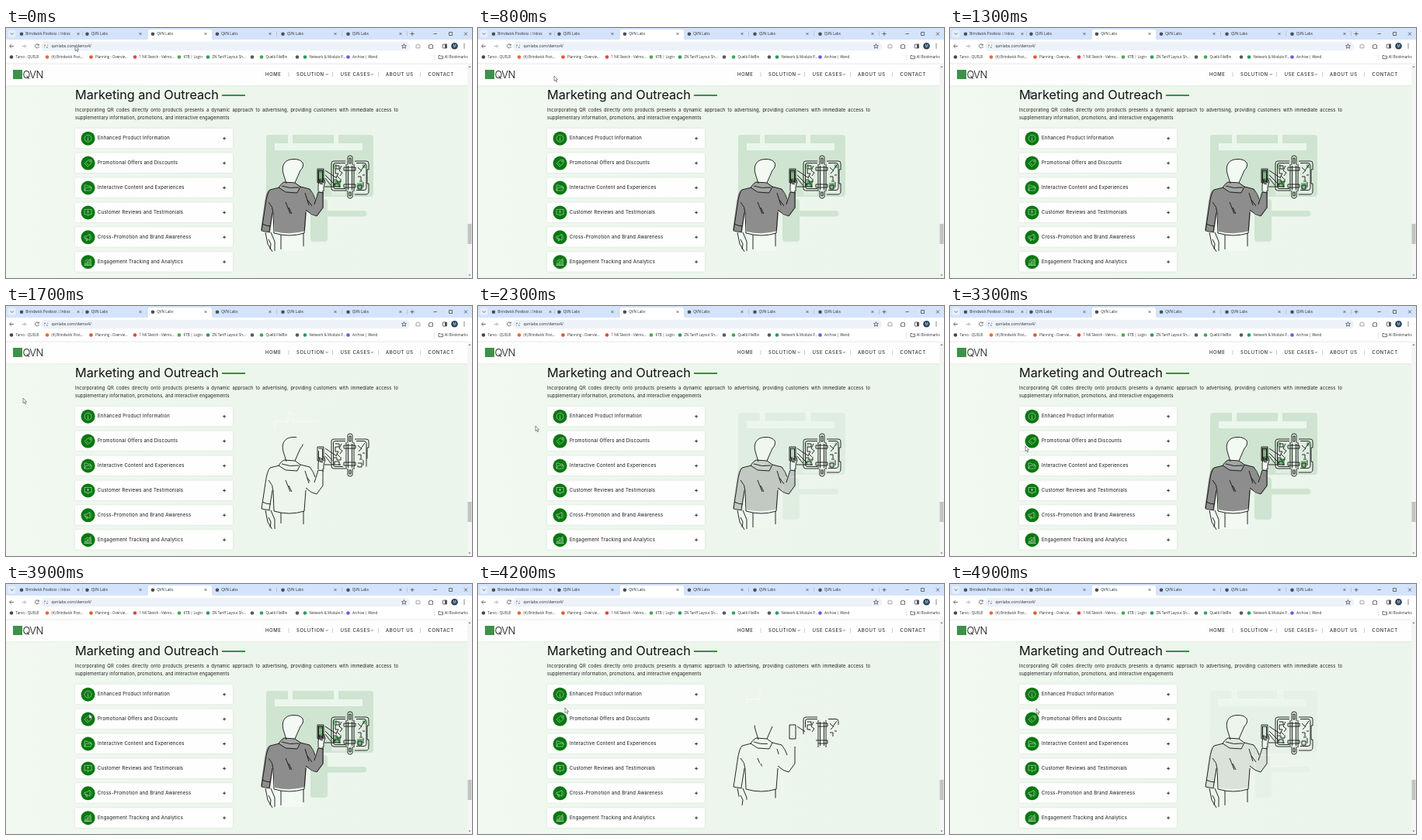
These frames come from a looping animation (600 by 323 pixels, 5000 ms). An HTML page:

```html
<!DOCTYPE html>
<html lang="en">
<head>
<meta charset="utf-8">
<title>Marketing and Outreach</title>
<style>
@property --d { syntax: "<number>"; inherits: true; initial-value: 1; }
@property --f { syntax: "<number>"; inherits: true; initial-value: 1; }
html, body { margin: 0; width: 100%; height: 100%; overflow: hidden; background: #ecf6ed; }
svg { position: absolute; left: 0; top: 0; width: 600px; height: 323px; }
text { font-family: Inter, sans-serif; fill: #111; }
.ui text { font-family: "Open Sans", "Noto Sans", sans-serif; fill: #2b2e33; }
.ico { fill: none; stroke: #4a4d52; stroke-width: .8; }
.menu text { font-size: 6px; letter-spacing: .6px; }
.row text { font-size: 6px; letter-spacing: .25px; }
.row path { fill: none; stroke: #e3f0e3; stroke-width: .55; stroke-linejoin: round; }
.row .plus { stroke: #222; stroke-width: .9; }
.card { fill: #fdfefd; filter: drop-shadow(0 .6px .8px #0000001a); }
.para { position: absolute; left: 89px; top: 101px; width: 416px; font: 5.8px/10.2px Inter, sans-serif; letter-spacing: .12px; color: #1c1c1c; white-space: nowrap; }
.para div { height: 10.2px; }
.para div:first-child { text-align-last: justify; white-space: normal; }

.art { animation: draw 5s infinite, tint 5s infinite; }
.fill { opacity: var(--f); }
.line path { --s: 0; fill: none; stroke: #111; stroke-width: .9; stroke-dasharray: 1px 1px;
  stroke-dashoffset: calc(1px * clamp(0, 1 - (var(--d) - var(--s)) * var(--k), 1)); }
.line .late { --s: .27; }
.line .halo { stroke: #fff; stroke-width: .6; opacity: calc(1 - var(--f)); }
@keyframes draw {
  0% { --d: 1; animation-timing-function: steps(1); }
  28% { --d: .09; animation-timing-function: steps(5); }
  38% { --d: 1; animation-timing-function: steps(1); }
  82% { --d: .09; animation-timing-function: steps(5); }
  92%, 100% { --d: 1; }
}
@keyframes tint {
  0% { --f: 1; animation-timing-function: steps(1); }
  28% { --f: 0; animation-timing-function: steps(1); }
  42% { --f: 0; animation-timing-function: steps(2); }
  46% { --f: .43; animation-timing-function: steps(3); }
  52% { --f: 1; animation-timing-function: steps(1); }
  82% { --f: 0; animation-timing-function: steps(1); }
  96% { --f: .07; animation-timing-function: steps(1); }
  98%, 100% { --f: .18; animation-timing-function: steps(1); }
}
.cursor { animation: move 5s infinite; }
.arrow { animation: hide 5s infinite steps(1); }
.beam { animation: show 5s infinite steps(1); }
@keyframes move {
  0% { transform: translate(89px, 23px); animation-timing-function: steps(1); }
  16% { transform: translate(98px, 62px); animation-timing-function: steps(1); }
  22% { transform: translate(101px, 74px); animation-timing-function: steps(2); }
  26% { transform: translate(104px, 83px); animation-timing-function: steps(4); }
  34% { transform: translate(22px, 119px); animation-timing-function: steps(6); }
  46% { transform: translate(74px, 155px); animation-timing-function: steps(10); }
  66% { transform: translate(97px, 181px); animation-timing-function: steps(1); }
  70% { transform: translate(100px, 178px); animation-timing-function: steps(7); }
  84% { transform: translate(112px, 160px); animation-timing-function: steps(7); }
  98%, 100% { transform: translate(111px, 161px); animation-timing-function: steps(1); }
}
@keyframes hide {
  0%, 28%, 100% { opacity: 1; }
  24% { opacity: 0; }
}
@keyframes show {
  0%, 28%, 100% { opacity: 0; }
  24% { opacity: 1; }
}
</style>
</head>
<body>
<svg viewBox="0 0 600 323">
  <defs>
    <linearGradient id="page">
      <stop offset="0" stop-color="#f1f9f1"/><stop offset=".5" stop-color="#ecf6ec"/><stop offset="1" stop-color="#ebf5eb"/>
    </linearGradient>
  </defs>
  <rect y="46" width="600" height="277" fill="url(#page)"/>

  <g class="ui">
    <rect width="600" height="20" fill="#d3e3fb"/>
    <rect y="15" width="600" height="31" fill="#fff"/>
    <path d="M180 15.5q3 0 3-3V5q0-3 3-3h76q3 0 3 3v7.500q0 3 3 3z" fill="#fff"/>
    <rect x="2.500" y="2.500" width="10" height="10" rx="3" fill="#e6eefc"/>
    <path class="ico" d="M5.700 6.500l2 2 2-2M520.500 7.500h5M523 5v5M550.500 7.500h4.500M570.500 5.500h4v4h-4zM590 5.500l4 4m0-4l-4 4"/>
    <path d="M348.500 4.500v6M432.500 4.500v6M516.500 4.500v6M98.500 4.500v6" stroke="#9fb3d3" stroke-width=".6"/>
    <g id="tabs"></g>
    <rect x="45" y="17.800" width="475" height="11.500" rx="5.700" fill="#edf1f8"/>
    <path class="ico" d="M10 23.500H5m2-2.300l-2.300 2.300 2.300 2.300M42 21.800a2.500 2.500 0 1 0 .4 2.300m0-3.300v1.500h-1.800M49 22.300h2m2 0h.8M49 25h.8m2 0h2"/>
    <path class="ico" d="M20.500 23.500h5m-2-2.300l2.300 2.300-2.300 2.300" opacity=".5"/>
    <path class="ico" d="M512.500 20.500l.9 2 2.100.2-1.600 1.400.5 2.100-1.900-1.100-1.900 1.100.5-2.100-1.600-1.400 2.100-.2zM544.500 22h1.500a1 1 0 0 1 2 0h1.500v4.300h-5zM562.500 21h5v5h-5z"/>
    <path class="ico" d="M528 22h1l.6-.9h1.800l.6.900h1v3.800h-5z" opacity=".6"/>
    <path d="M565 21h2.500v5H565z" fill="#4a4d52"/>
    <circle cx="577.500" cy="23.300" r="4.300" fill="#27465f"/>
    <text x="577.500" y="25" font-size="4.600" text-anchor="middle" style="fill:#fff">M</text>
    <path d="M590 20.300v1.200m0 1.200v1.200m0 1.200v1.200" stroke="#444" stroke-width="1.200"/>
    <path d="M551.500 34v7" stroke="#c5d3ea" stroke-width=".6"/>
    <path class="ico" d="M557 35.500h2l.7.700h2.800v3.500H557z"/>
    <g id="marks"></g>
  </g>

  <g class="menu">
    <rect y="46" width="594" height="28" fill="#fdfefd" style="filter:drop-shadow(0 .5px .8px #00000014)"/>
    <path d="M0 46.300h600" stroke="#dfe3ea" stroke-width=".6"/>
    <rect x="9" y="54" width="12" height="12" fill="#3f9149"/>
    <text x="21.500" y="64.900" style="font-size:13px;font-weight:300;letter-spacing:-.6px">QVN</text>
    <text x="334" y="62.200">HOME</text>
    <text x="374" y="62.200">SOLUTION</text>
    <text x="430.500" y="62.200">USE CASES</text>
    <text x="489" y="62.200">ABOUT US</text>
    <text x="543.500" y="62.200">CONTACT</text>
    <path d="M364 57v6M420.500 57v6M479.500 57v6M533.500 57v6" stroke="#bbb" stroke-width=".7"/>
    <path class="ico" d="M411.800 59.200l1.400 1.400 1.400-1.400M469.800 59.200l1.400 1.400 1.400-1.400"/>
  </g>

  <text x="89" y="92.300" font-size="16.300" letter-spacing="-.05">Marketing and Outreach</text>
  <path d="M278 87h30" stroke="#08780f" stroke-width="1.600"/>
  <g id="rows"></g>

  <g class="art">
    <g class="fill">
      <path fill="#cfe4d1" d="M339 138h130q4 0 4 4v72q0 4-4 4H339q-4 0-4-4v-72q0-4 4-4z"/>
      <path fill="#ebf6ec" d="M346 150q0-1.500 1.500-1.500t1.500 1.500v-1h14v-11h6v11h53v-11h6v11h28v1q0-1.500 1.500-1.500t1.500 1.500v8H346z"/>
      <path fill="#cfe4d1" d="M396 221h14q4 0 4 4v11h46q4.500 0 4.500 3.800T460 243.500h-46V272q0 4-4 4h-14q-4 0-4-4v-47q0-4 4-4z"/>
      <path fill="#f3f9f3" d="M361 201l-4-13c-3-12 3-18.500 13-18.500s13 4 12 9l-3 6-7 16z"/>
      <path fill="#f3f9f3" d="M331 262l5 17 6 10 5-1-4-25zM347 264h36v24h-36zM401 211l1-13 7-2v14z"/>
      <path fill="#8c8d8c" d="M352 206l5-7 15 1 8 5 11 3 8 14 3-11 7 2v19l-8 11-14-6-2 25q-18 6-39 1l-2-27-4 28-12-3 5-36q2-15 6-16z"/>
      <path fill="#a3a5a3" d="M351 206l7-7 14 1 7 5-4 8-15-1z"/>
      <path fill="#77857a" d="M401 183h8v17h-8z"/>
      <path fill="#fff" d="M419 172h18v44h-18zM449 172h18v44h-18zM439 166h8v53h-8z" opacity=".35"/>
      <path fill="#76bb7c" d="M421 197h10v8h-10zM452 200h7v8h-7zM422 176h4v6h-4zM459 176h4v5h-4zM403 187h4v7h-4z"/>
    </g>
    <g class="line" id="lines"></g>
  </g>

  <rect x="594" y="46" width="6" height="277" fill="#f4f5f4"/>
  <rect x="594.500" y="253" width="5" height="26" fill="#c1c3c1"/>
  <path d="M595.500 51l1.500-2 1.500 2zM595.500 318.500l1.500 2 1.500-2z" fill="#777"/>
</svg>

<div class="para">
  <div>Incorporating QR codes directly onto products presents a dynamic approach to advertising, providing customers with immediate access to</div>
  <div>supplementary information, promotions, and interactive engagements</div>
</div>

<svg viewBox="0 0 600 323">
  <g class="cursor">
    <path class="arrow" d="M0 0v6.500l1.500-1.300 1.100 2.500 1.100-.5-1.100-2.400h2z" fill="#fff" stroke="#222" stroke-width=".5"/>
    <path class="beam" d="M-1.500 0h3M0 0v7M-1.500 7h3" fill="none" stroke="#111" stroke-width=".6"/>
  </g>
</svg>

<script>
const put = (id, list, make) => {
  document.getElementById(id).innerHTML = list.map(make).join("");
};
const label = (x, y, size, text) => `<text x="${x}" y="${y}" font-size="${size}">${text}</text>`;
const dot = (x, y, color, r = 2.3) => `<circle cx="${x}" cy="${y}" r="${r}" fill="${color}"/>`;
const cross = x => `<path class="ico" d="M${x - 1.4} 6.100l2.800 2.800m0-2.800l-2.800 2.800"/>`;

put("tabs", [
  [20, "Brindwick Postbox :: Inbox", 93], [104.5, "QVN Labs", 173], [189, "QVN Labs", 257],
  [272, "QVN Labs", 340], [356.5, "QVN Labs", 424], [440.5, "QVN Labs", 508]
], ([x, text, end]) => dot(x, 7.7, "#4b5157") + label(x + 5.2, 9.4, 4.7, text) + cross(end));

put("marks", [
  [7, "#4a4a42", "Tarvo - QUELB"], [53, "#f0672f", "(4) Brindwick Post..."],
  [109.5, "#e2542c", "Planning - Overvie..."], [166, "#e5443a", "1 NK Sketch - Velmo..."],
  [223, "#4fa74f", "KTB | Login"], [260, "#2a9c58", "ZN Tariff Layout Sh..."],
  [317, "#555a60", ""], [329, "#3ba45b", "Quelb FileBin"],
  [375, "#555a60", ""], [385, "#2a9c58", "Network &amp; Module P..."],
  [440.5, "#625df5", "Archive | Wend"]
], ([x, color, text]) => dot(x, 37.5, color) + label(x + 5.5, 39.2, 4.5, text));
document.getElementById("marks").innerHTML += label(564.5, 39.2, 4.5, "All Bookmarks") + label(58.5, 25.3, 5.2, "qvnlabs.com/demo4/");

// icon paths are relative to the centre of their disc
put("rows", [
  ["Enhanced Product Information", "M-4.500 0a4.500 4.500 0 1 0 9 0a4.500 4.500 0 1 0-9 0M-.8-.7H.2L-.3 2.500H.8M.2-2.600v.9"],
  ["Promotional Offers and Discounts", "M-4.500.5L.5-4H4.500V0L-.5 4.500zM2.300-2.500h.8v.8h-.8zM-2 .5L.5 2"],
  ["Interactive Content and Experiences", "M-4.500 3.500v-7h3l1 1.300h4V0M-4.500 3.500L-2.800-.2H5L3.500 3.500z"],
  ["Customer Reviews and Testimonials", "M-4.500-4h9v6.500H1L0 4.500-1 2.500h-3.500zM0-2.800V.2M0 .8v.8M-1.500-1h3"],
  ["Cross-Promotion and Brand Awareness", "M-4.500-1.200h2.500L2.500-4V4L-2 1.500h-2.500zM-3 1.500l.8 3h1.300L-1.300 2M3.800-1.500l1-1M4 0h1.300M3.800 1.500l1 1"],
  ["Engagement Tracking and Analytics", "M-5 4.500H5M-4 4.500v-3h1.500v3M-1 4.500v-5H.5v5M2.300 4.500v-7h1.500v7M-4.500-.5L-1-3 1-2 4-4.800"]
], ([text, icon], i) => {
  const y = 142.7 + i * 31.9;
  return `<g class="row"><rect class="card" x="89" y="${y - 13}" width="203" height="25.500" rx="2"/>
    ${dot(105.6, y, "#08780f", 9)}<path d="${icon}" transform="translate(105.600 ${y})"/>
    <text x="118" y="${y + 1.6}">${text}</text>
    <path class="plus" d="M279.200 ${y}h3.800M281.100 ${y - 1.9}v3.800"/></g>`;
});

// [speed, path, class]: a higher speed finishes its stroke sooner
put("lines", [
  [.8, "M346 158v-9h17v-11h6v11h53v-11h6v11h37", "halo"],
  [.8, "M392 272v-47q0-4 4-4h14q4 0 4 4v11h46", "halo"],
  [1.3, "M361 201L357 188C354 176 360 169.500 370 169.500Q378 169 382 174"],
  [3.7, "M372 200L379 184"],
  [1.6, "M379 184q5-5 3-10", "late"],
  [4, "M351 206q3-5 7-7l14 1 7 5-4 8-15-1-9-6"],
  [3, "M355 204q10 4 22 2"],
  [4, "M352 206l-12 3q-4 4-6 20l-5 33 11 2"],
  [3, "M330 253q5 3 11 3", "late"],
  [4, "M338 225q6 6 6 14l1 26q20 6 39 0l2-27"],
  [4, "M343 238l-4 25"],
  [4, "M379 205l12 3q5 6 7 13"],
  [4, "M386 235q7 7 14 8l8-11V210"],
  [3, "M397 228l5-16 7 1", "late"],
  [1.6, "M360 225l6 15"],
  [1.6, "M364 232l4 8"],
  [1.6, "M385 213l5 16"],
  [1.6, "M388 222l6 8", "late"],
  [1.5, "M334 264l3 15 6 10"],
  [1.5, "M341 264l5 12v12M338 273l3 6-1 7"],
  [2, "M354 267v19", "late"],
  [2.5, "M383 265v17"],
  [4, "M401 182h8v18h-8z"],
  [2.5, "M402.500 184h5v14h-5z", "late"],
  [2.5, "M402 211v-8l2-8M409 211v-6l2-6-2-5M405 196l3 3M404 201l4 1", "late"],
  [2.5, "M411 184l15 10"],
  [2, "M411 190l13 13", "late"],
  [2, "M411 194l7 9M410 205h21", "late"],
  [2, "M437 172h-15q-3 0-3 3v32q0 3 3 3h15"],
  [1.5, "M437 174.500h-13q-2.500 0-2.500 2.500v28q0 2.500 2.500 2.500h13"],
  [1.5, "M449 172h15q3 0 3 3v8h-2v18h2v9q0 5-3 5h-15", "late"],
  [1.2, "M451 174.500h10q3 0 3 3v29q0 3-3 3h-10"],
  [3, "M438 176v35M440.500 178v31M445.500 178v31M448 176v35"],
  [2.2, "M440 177v-10q0-2 3-2t3 2v10M442 168h2v7h-2z", "late"],
  [2.2, "M440 210v8q0 2 3 2t3-2v-8M442 212h2v5h-2z", "late"],
  [1.5, "M435 180h15v4h-15zM435 202h15v4h-15z"],
  [2, "M424 178h5v4h-5v6h4l-3 5M432 178l-3 6 4 3-3 4"],
  [1.8, "M422 196h4v3h5v-4M423 205v-4h6v5M426 191l4 4", "late"],
  [1.6, "M453 180l4 4 5-7M454 188l4-4M453 192h4v5M459 190h3"],
  [1.5, "M453 203h5v5h-5zM460 199v7M455 198h4", "late"]
], ([k, d, cls = ""]) => `<path class="${cls}" style="--k:${k}" pathLength="1" d="${d}"/>`);
</script>
</body>
</html>
```
